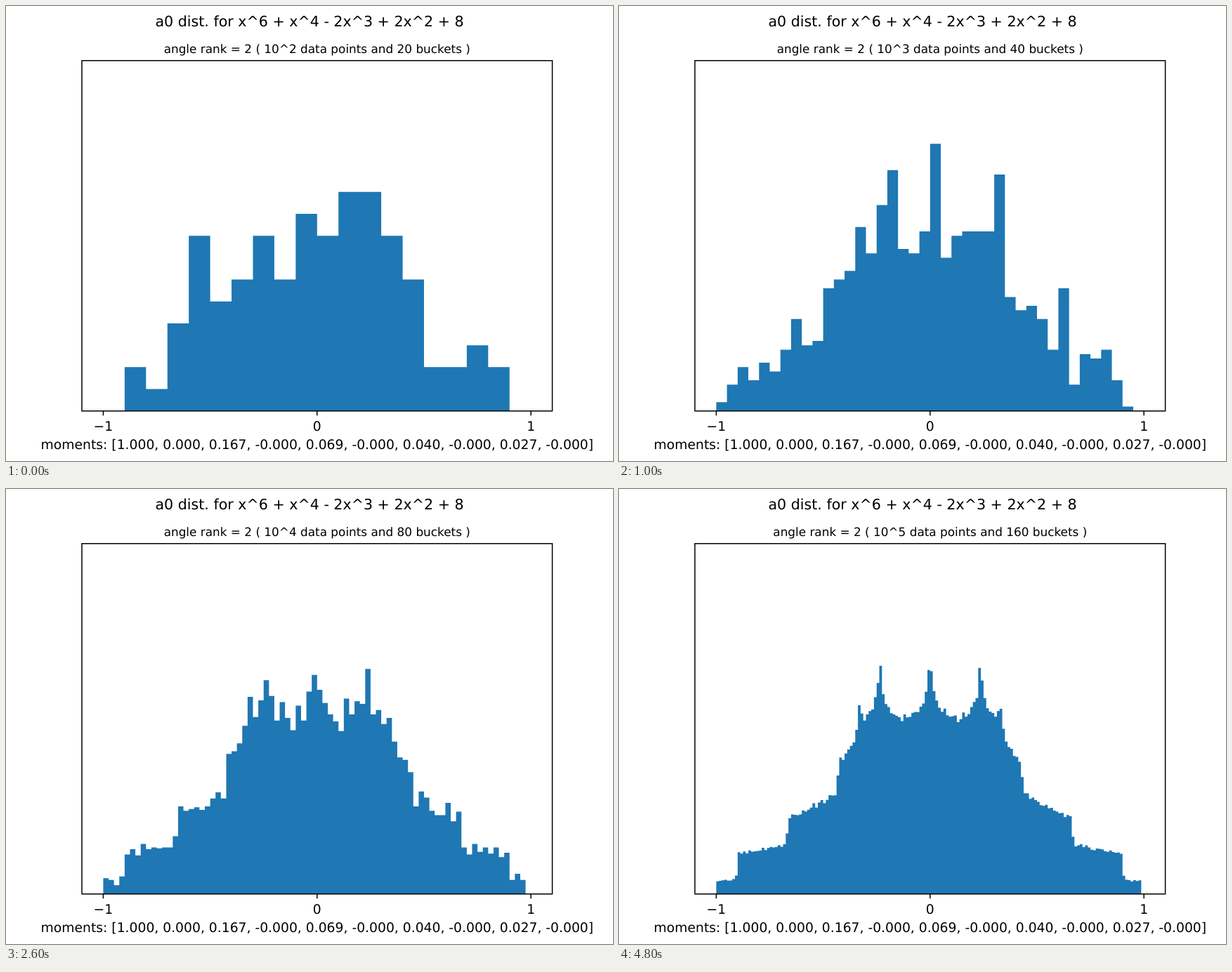
Recreate the animation shown at these times as an HTML page. Size 864x648 px, loop 6000 ms.

```html
<!DOCTYPE html>
<html lang="en">
<head>
<meta charset="utf-8">
<title>a0 distribution</title>
<style>
  html, body { margin: 0; width: 100%; height: 100%; overflow: hidden; background: #fff; }
  svg { display: block; width: 864px; height: 648px; }
  text { font: 18.75px "DejaVu Sans", sans-serif; text-anchor: middle; text-rendering: geometricPrecision; }
</style>
</head>
<body>
<svg viewBox="0 0 864 648">
  <path id="bars" fill="#1f77b4"/>
  <path d="M108 77.76H777.6V576.72H108ZM138.44 576.72v6.56M442.8 576.72v6.56M747.16 576.72v6.56"
        fill="none" stroke="#000" stroke-width="1.5"/>
  <text x="432" y="29" style="font-size:20.625px">a0 dist. for x^6 + x^4 - 2x^3 + 2x^2 + 8</text>
  <text id="title" x="442.8" y="66.6" style="font-size:16.875px"></text>
  <text x="138.44" y="605">−1</text>
  <text x="442.8" y="605">0</text>
  <text x="747.16" y="605">1</text>
  <text x="442.8" y="631.3">moments: [1.000, 0.000, 0.167, -0.000, 0.069, -0.000, 0.040, -0.000, 0.027, -0.000]</text>
</svg>
<script>
const bars = document.getElementById('bars');
const title = document.getElementById('title');

// Angles of the polynomial's roots: x + 2/x is a root of (t + 2)(t^2 - 2t - 1).
const angles = [-2, 1 + Math.SQRT2, 1 - Math.SQRT2].map(t => Math.acos(t / Math.sqrt(8)));
const trace = r => angles.reduce((sum, a) => sum + Math.cos(r * a), 0) / 3;

function histogram(points, buckets) {
  const counts = new Array(buckets).fill(0);
  for (let r = 1; r <= points; r++) {
    // The tiny offset keeps values lying exactly on an edge in the upper bucket.
    counts[Math.floor((trace(r) + 1) * buckets / 2 + 1e-9)]++;
  }
  return counts.slice(0, -1); // the last bucket is not shown
}

function outline(points, buckets) {
  const left = 138.44, base = 576.72;
  const step = 608.73 / buckets;
  const unit = 498.96 * buckets / (3.2 * points);
  const steps = histogram(points, buckets).map((n, i) =>
    `V${(base - n * unit).toFixed(2)}H${(left + (i + 1) * step).toFixed(2)}`);
  return `M${left} ${base}${steps.join('')}V${base}Z`;
}

const scenes = [2, 3, 4, 5].map(power => {
  const buckets = 5 * 2 ** power;
  return {
    path: outline(10 ** power, buckets),
    text: `angle rank = 2 ( 10^${power} data points and ${buckets} buckets )`
  };
});

let shown = -1;
function draw() {
  const index = Math.min(3, Math.floor(performance.now() % 6000 / 1000));
  if (index !== shown) {
    shown = index;
    bars.setAttribute('d', scenes[index].path);
    title.textContent = scenes[index].text;
  }
  requestAnimationFrame(draw);
}
draw();
</script>
</body>
</html>
```
